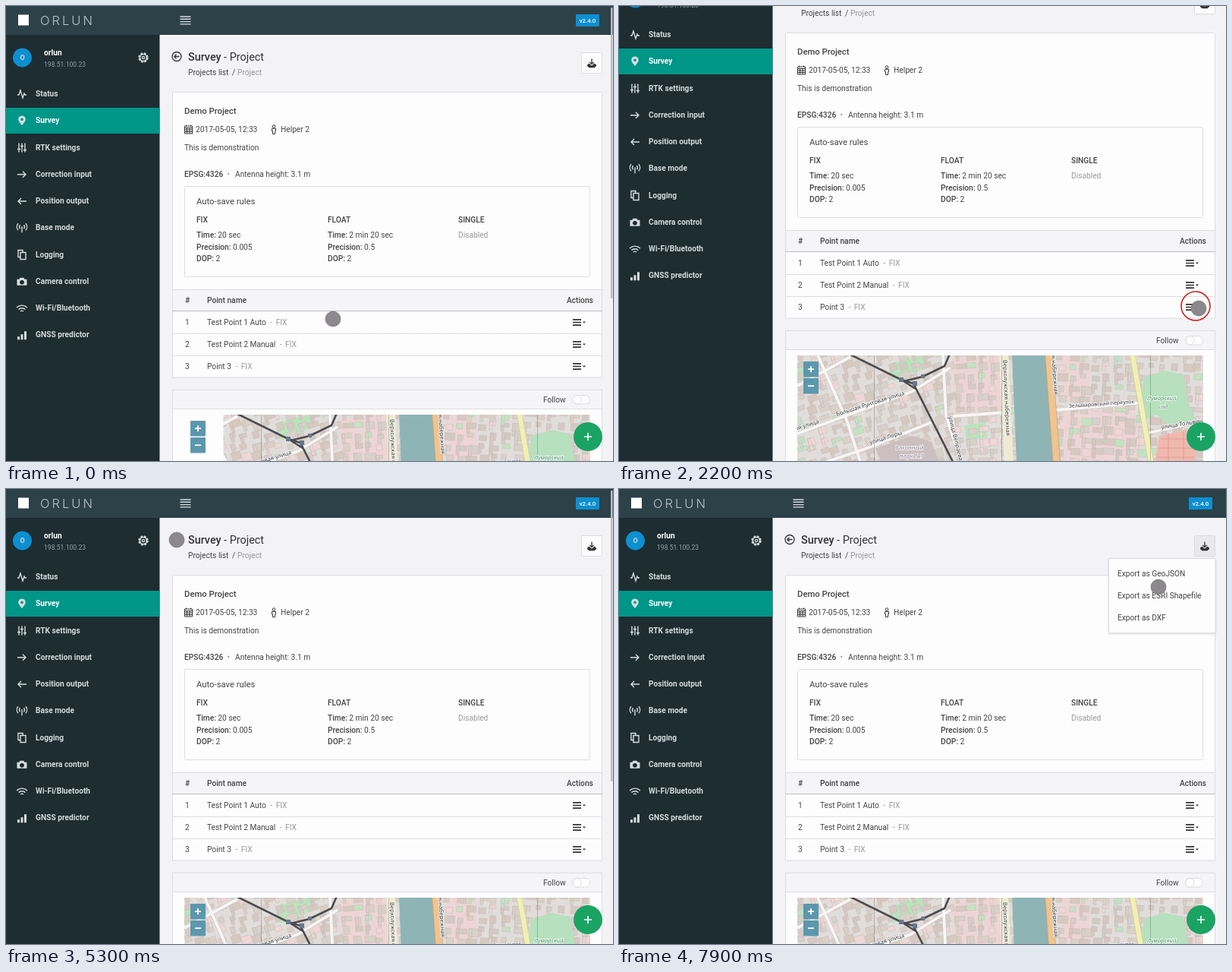
Animation, 800 px wide and 599 px high, one loop 8 s. Source, as an HTML page:

```html
<!DOCTYPE html>
<html lang="en">
<head>
<meta charset="utf-8">
<title>Survey project</title>
<style>
  html, body { margin: 0; width: 100%; height: 100%; overflow: hidden; }
  svg { display: block; width: 800px; height: 599px; background: #f3f2f5; }
  text { font: 10.2px Roboto, sans-serif; fill: #444; }
  .b { font-weight: 500; }
  .mid { font-size: 11.3px; }
  .title { font-size: 14.4px; fill: #333; }
  .mute { fill: #999; }
  .nav { font-weight: 600; fill: #d0d9dc; }
  .brand { font: 300 16.5px Inter, sans-serif; letter-spacing: 3px; fill: #b8c6cb; }
  .line { fill: none; stroke: #333; stroke-width: 1.3; }
  .light { fill: none; stroke: #d5dde0; stroke-width: 1.4; }
  .solid { fill: #d5dde0; fill-rule: evenodd; }
  .dark { fill: #333; }
  .card { fill: #fefdfe; stroke: #dddce0; }
  .head { fill: #f5f4f6; stroke: #dddce0; }
  .menu { fill: #fefdfe; stroke: #dcdcde; filter: drop-shadow(0 1px 1px #0002); }
  .map text { font: 7.6px "Noto Sans", sans-serif; fill: #333; stroke: #fff; stroke-width: 1.4px; paint-order: stroke; }
  .map path { fill: none; }
</style>
</head>
<body>
<script>
const text = (x, y, s, cls = '', attrs = '') => `<text x="${x}" y="${y}" dy=".355em" class="${cls}" ${attrs}>${s}</text>`;
const rect = (x, y, w, h, cls = '', attrs = '') => `<rect x="${x}" y="${y}" width="${w}" height="${h}" class="${cls}" ${attrs}/>`;
const icon = (x, y, d, cls = 'line', attrs = '') => `<path transform="translate(${x} ${y})" d="${d}" class="${cls}" ${attrs}/>`;
const bold = s => `<tspan class="b">${s}</tspan>`;
const fill = c => `fill="${c}"`;

// Sidebar
const navItems = [
  ['Status', 'M-6 1h2l2-6 3 10 2-6 1 2h2', 'light'],
  ['Survey', 'M0 6C-3 2-4.8 0-4.8-2a4.8 4.8 0 0 1 9.6 0C4.8 0 3 2 0 6ZM0-3.8a1.8 1.8 0 1 0 .01 0Z', 'solid'],
  ['RTK settings', 'M-4-6V6M0-6V6M4-6V6M-6 2h4M-2-2h4M2 3h4', 'light'],
  ['Correction input', 'M-6 0H5M1-4L5 0 1 4', 'light'],
  ['Position output', 'M6 0H-5M-1-4L-5 0-1 4', 'light'],
  ['Base mode', 'M-2.5-4a4 4 0 0 0 0 5M2.5-4a4 4 0 0 1 0 5M-5-6a7 7 0 0 0 0 9M5-6a7 7 0 0 1 0 9M0-2V6', 'light'],
  ['Logging', 'M-2-3h7v9h-7zM-2 3h-3v-9h6v3', 'light'],
  ['Camera control', 'M-6.5-3h3l1-2h5l1 2h3V5h-13ZM0-2a3 3 0 1 0 .01 0Z', 'solid'],
  ['Wi-Fi/Bluetooth', 'M-7-1a10 10 0 0 1 14 0M-4.5 1.5a6.5 6.5 0 0 1 9 0M-2 4a3 3 0 0 1 4 0', 'light'],
  ['GNSS predictor', 'M-6 2h3v4h-3zM-1.5-1h3v7h-3zM3-5h3V6H3z', 'solid'],
];
const sidebar = rect(0, 134, 202.5, 34, '', fill('#009688')) +
  navItems.map(([name, d, cls], i) => {
    const y = 115.5 + 35.25 * i;
    return icon(21, y + .5, d, cls) + text(39, y, name, 'nav', i == 1 ? 'style="fill:#fff"' : '');
  }).join('') +
  `<circle cx="21.5" cy="68" r="12.5" fill="#0d8fd0"/>` +
  text(21.5, 68, 'O', 'nav', 'text-anchor="middle" style="font-size:9px"') +
  text(50, 61, 'orlun', 'nav', 'style="fill:#fff"') +
  text(50, 76.5, '198.51.100.23', '', 'style="font-size:8.6px;fill:#8fa0a6"') +
  `<circle cx="181" cy="68" r="5.2" class="light" stroke-dasharray="2.6 1.5" style="stroke-width:3"/>
   <circle cx="181" cy="68" r="4.6" class="light"/><circle cx="181" cy="68" r="1.6" class="light"/>`;

const header = rect(0, 0, 800, 38, '', fill('#2d4149')) +
  rect(16, 11.5, 14, 14, '', fill('#fff')) + text(45, 19, 'ORLUN', 'brand') +
  icon(236.5, 19, 'M-7-5H7M-7-1.7H7M-7 1.6H7M-7 4.9H7', 'light') +
  rect(751, 11, 31, 16, '', fill('#0d8fd0') + ' rx="1"') +
  text(766.5, 19.2, 'v2.4.0', 'b', 'text-anchor="middle" style="font-size:7.8px;fill:#fff"');

// Map
let seed = 11;
const random = () => (seed = seed * 16807 % 2147483647) / 2147483647;
const block = (x, y, w, h, angle) => {
  const c = Math.cos(angle), s = Math.sin(angle);
  return `M${x} ${y}l${w * c} ${w * s} ${-h * s} ${h * c} ${-w * c} ${-w * s}z`;
};
const shades = { '#d9d0c9': '', '#d5c9c2': '', '#eed7d6': '', '#c3e2c4': '' };
for (let x = 232; x < 775; x += 15) {
  for (let y = 455; y < 605; y += 14) {
    const angle = x < 440 ? -.32 : x < 510 ? -.08 : .06, pick = random();
    const color = Object.keys(shades)[pick < .45 ? 0 : pick < .78 ? 1 : pick < .93 ? 2 : 3];
    const px = x + random() * 4, py = y + random() * 4, w = 6 + random() * 9, h = 5 + random() * 6;
    shades[color] += block(px, py, w, h, angle);
    if (random() < .5) shades[color] += block(px, py, 4, h + 6, angle);
  }
}
const stroke = (d, color, width) => `<path d="${d}" stroke="${color}" stroke-width="${width}" stroke-linejoin="round"/>`;
const area = (d, color) => `<path d="${d}" style="fill:${color}"/>`;
const label = (x, y, angle, s, style = '') => `<text transform="translate(${x} ${y}) rotate(${angle})" style="${style}">${s}</text>`;
const roads = 'M235 563L385 508 437 476M235 613L330 581 412 548M427 460L431 540 452 602M262 460L300 545 318 600' +
  'M575 532L690 522M698 562L770 546M440 540L510 535M235 500L305 462';
const rails = 'M303 458L372 492 388 497 441 602M375 494L400 488 429 474 436 458M372 492L391 504';
const map = `<clipPath id="mapClip">${rect(235, 460, 535, 150)}</clipPath>
<g class="map" transform="translate(0 78)" clip-path="url(#mapClip)">
  ${rect(235, 460, 535, 150, '', fill('#e0dddb'))}
  ${area('M440 465l60-5 4 75-62 6zM580 535l98-8 8 72-100 4zM582 460h36l4 55-38 6z', '#eed5d5')}
  ${area('M235 474l22-9 8 18-30 12zM355 472l42-12 14 14-50 20zM455 552l28-4 3 20-28 4z', '#b9e3bd')}
  ${Object.entries(shades).map(([c, d]) => `<path d="${d}" style="fill:${c}" stroke="#c6b9b2" stroke-width=".5"/>`).join('')}
  ${area('M338 582l48-16 26 8 10 28h-76z', '#cbbfc0')}
  ${area('M692 488l28-8 24 6 6 36 10 22-34 8-18-14-26 12 6-30z', '#b6e0be')}
  ${area('M712 566l48-10v45h-54z', '#efb9b0')}
  ${stroke('M714 570h44M712 582h46M710 594h48M724 562v40M744 558v40', '#e39a8f', 1)}
  ${stroke(roads, '#cbc4c0', 4.8)}${stroke(roads, '#f8f6f5', 3.8)}
  ${stroke('M507 455L514 605', '#eeebd2', 12)}
  ${area('M518 460h45l10 142h-49z', '#8eb4b6')}
  ${stroke('M566 455L577 605', '#c9a477', 10)}${stroke('M566 455L577 605', '#f0c48f', 8.5)}
  ${stroke('M676 455L702 605', '#cfcb90', 8)}${stroke('M676 455L702 605', '#f1efb8', 6.5)}
  ${stroke('M336.5 460V600M504.5 460V600M700.5 460V600', '#0004', .8)}
  ${stroke(rails, '#4c4b4e', 2.6)}
  ${area('M369 489h6v6h-6zM387 494h6v6h-6zM398 485h5v5h-5z', '#65788a')}
  ${label(287, 540, -17.5, 'Большая Рунтовая улица')}
  ${label(233, 559, -18, 'ая улица')}
  ${label(331, 577, -17, 'улица Лоры')}
  ${label(434, 541, 76, 'улица Вепраева')}
  ${label(506, 466, 87.5, 'Верхолужская набережная')}
  ${label(570, 460, 86, 'я набережная')}
  ${label(593, 529, -4, 'Зельмаровский переулок', 'font-size:6.9px')}
  ${label(715, 557, -9, 'улица Тольвина')}
  ${label(696, 519, 0, 'Лумарский', 'font-style:italic;fill:#3c8a5a')}
  ${label(711, 530, 0, 'сад', 'font-style:italic;fill:#3c8a5a')}
  ${label(364, 584, 0, 'Вагонный', 'fill:#87788a')}
  ${label(370, 595, 0, 'парк №7', 'fill:#87788a')}
</g>`;

// Pages
const pageTitle = name => icon(225, 66.5, 'M6 0A6 6 0 1 1-6 0 6 6 0 0 1 6 0ZM3.5 0H-3M-.5-2.8L-3.2 0-.5 2.8') +
  text(240, 66.5, bold('Survey') + ' - ' + name, 'title') + text(240, 87.5, 'Projects list <tspan dx="2">/</tspan>');

const rules = [
  [251, 'FIX', '20 sec', '0.005'],
  [424, 'FLOAT', '2 min 20 sec', '0.5'],
].map(([x, name, time, precision]) => text(x, 281.5, name, 'b') +
  text(x, 301, bold('Time:') + ' ' + time) + text(x, 317, bold('Precision:') + ' ' + precision) +
  text(x, 332.5, bold('DOP:') + ' 2')).join('');

const points = ['Test Point 1 Auto', 'Test Point 2 Manual', 'Point 3'].map((name, i) => {
  const y = 416.3 + 29 * i;
  return (i < 2 ? `<path d="M220 ${431.5 + 29 * i}H785" stroke="#dddce0"/>` : '') + text(236, y, i + 1) +
    text(265, y, `${name} <tspan class="mute" dx="3">- <tspan dx="2">FIX</tspan></tspan>`) +
    icon(752.5, y + .2, 'M-5.5-3.6h11M-5.5 0h11M-5.5 3.6h11', 'line', 'style="stroke-width:1.7"') +
    icon(762, y + .3, 'M-2-1h4L0 1.2z', 'dark');
}).join('');

const zoom = (y, d) => rect(243, y, 20, 20.5, '', fill('#5c97ad') + ' rx="1"') +
  icon(253, y + 10.2, d, '', 'stroke="#fff" stroke-width="1.8"');

const projectPage = pageTitle('Project') + text(305, 87.5, 'Project', 'mute') +
  rect(758.5, 61.5, 27, 27, 'card', 'id="exportButton" rx="1"') +
  icon(772, 75.5, 'M0-6V1M-2.6-1.6L0 1 2.6-1.6') +
  icon(772, 75.5, 'M-6 2L-3.5 0 0 3.2 3.5 0 6 2v1.5L3.5 5.8h-7L-6 3.5z', 'dark') +
  rect(219.5, 113.5, 566, 375.5, 'card', 'rx="1"') + text(235, 138, 'Demo Project', 'b mid') +
  icon(240.5, 162.5, 'M-5-4.5h10v10h-10zM-5-2h10M-5 .5h10M-5 3h10M-2-2v7M1.5-2v7M-3-6v2M3-6v2', 'line', 'style="stroke-width:1"') +
  text(250, 162.5, '2017-05-05, 12:33') +
  icon(353, 162.5, 'M-1.8-4a1.8 1.8 0 1 0 3.6 0 1.8 1.8 0 1 0-3.6 0M-2.5-1.2h5v3.5h-1V6h-3V2.3h-1z', 'line', 'style="stroke-width:1"') +
  text(362, 162.5, 'Helper 2') + text(235, 186, 'This is demonstration') +
  text(235, 221.5, 'EPSG:4326', 'b') + text(291.5, 221.5, '•', 'mute') + text(302, 221.5, 'Antenna height: 3.1 m') +
  rect(235.5, 237.5, 534, 119, 'card', 'rx="2"') + text(251, 257, 'Auto-save rules', 'mid') + rules +
  text(596, 281.5, 'SINGLE', 'b') + text(596, 301, 'Disabled', 'mute') +
  rect(219.5, 373.5, 566, 28, 'head') + rect(220, 461, 565, 28, '', 'id="activeRow" fill="#f3f2f4"') +
  text(236, 387.5, '#', 'b') + text(265, 387.5, 'Point name', 'b') + text(739, 387.5, 'Actions', 'b') +
  '<path d="M219 401.5H786" stroke="#bdbcc0"/>' + points +
  rect(219.5, 505.5, 566, 400, 'card') + rect(219.5, 505.5, 566, 25, 'head') + text(708, 518, 'Follow') +
  rect(746.5, 512.5, 23, 11.5, 'card', 'rx="5.7"') + '<circle cx="752.5" cy="518.3" r="5.7" class="card"/>' +
  map + rect(235, 538, 51.5, 140, '', 'id="missingTile" fill="#fefdfe"') +
  zoom(546, 'M-4 0h8M0-4v8') + zoom(568, 'M-4 0h8') +
  `<g id="removeMenu">${rect(624.5, 482.5, 140, 39.5, 'menu', 'rx="2"')}
    ${icon(642, 502.5, 'M-4.5-2.5h9V6h-9zM-6-2.5H6M-2-2.5V-5h4v2.5M-1.7 0v3.5M1.7 0v3.5', 'line', 'style="stroke:#e0392f"')}
    ${text(658, 502.5, 'Remove point')}</g>
  <g id="exportMenu">${rect(645.5, 91.5, 140.5, 98, 'menu', 'rx="2"')}
    ${['GeoJSON', 'ESRI Shapefile', 'DXF'].map((f, i) => text(657, 111 + 29 * i, 'Export as ' + f)).join('')}</g>`;

const sigmas = [['Lat:', '59.96032536°', 'E', '0.002'], ['Lon:', '30.33406695°', 'N', '0.001'], ['H:', '59.387 m', 'U', '0.003']];
const pointPage = pageTitle('Point info') + text(307, 87.5, 'Demo Project <tspan dx="2">/</tspan>') + text(379, 87.5, 'Point', 'mute') +
  rect(219.5, 113.5, 566, 163, 'card', 'rx="1"') + text(235, 137, 'Point name', 'b') + text(235, 159, 'Test Point 1 Auto', 'mid') +
  text(235, 200.5, 'Antenna height', 'b mid') + text(235, 221.5, '3.1 m') + text(510, 200.5, 'EPSG:4326', 'b mid') +
  sigmas.map(([name, value, axis, error], i) => {
    const y = 221.5 + 15.7 * i;
    return text(510, y, name) + text(532, y, value, 'b') +
      text(648, y, `σ<tspan style="font-size:5.5px">${axis}</tspan> = ${bold(error + ' m')}`);
  }).join('');

document.body.innerHTML = `<svg viewBox="0 0 800 599">
  ${rect(0, 0, 202.5, 599, '', fill('#1e2d32'))}
  <g id="page">${header}${sidebar}<g id="project">${projectPage}</g><g id="point">${pointPage}</g></g>
  ${rect(797, 2, 2.5, 383, '', 'id="scrollbar" rx="1" fill="#bcbbbf"')}
  <circle cx="767" cy="567" r="19" fill="#1ba364"/>
  ${icon(767, 567, 'M-5 0h10M0-5v10', '', 'stroke="#fff" stroke-width="1.6"')}
  <circle id="ring" r="19" fill="none" stroke="#d0251c" stroke-width="1.6"/>
  <circle id="cursor" r="10" fill="#8b898b" stroke="#7b797b" stroke-width=".8"/>
</svg>`;

// Motion: cursor stops as [time, x, y], clicks as [start, end, x, y]
const stops = [
  [0, 431, 412], [1000, 431, 412], [1300, 433, 402], [1400, 433, 402], [2100, 764, 398], [2900, 764, 398],
  [3300, 761, 372], [3700, 456, 338], [4200, 456, 338], [4720, 225, 67], [5300, 225, 67], [5900, 535, 314],
  [6200, 535, 314], [6700, 775, 79], [6900, 775, 79], [7000, 771, 88], [7400, 771, 88], [7900, 711, 129], [8000, 711, 129],
];
const clicks = [[2100, 2500, 760, 395], [3700, 4000, 456, 338], [6600, 6900, 776, 78]];
const $ = id => document.getElementById(id);
const place = (id, x, y) => $(id).setAttribute('transform', `translate(${x} ${y})`);
const show = (id, on) => $(id).style.display = on ? '' : 'none';
const smooth = (t, a, b) => { const k = Math.min(1, Math.max(0, (t - a) / (b - a))); return k * k * (3 - 2 * k); };

function draw(now) {
  const t = Math.floor(now % 8000 / 100) * 100;
  const i = stops.findIndex(s => s[0] > t), [t0, x0, y0] = stops[i - 1], [t1, x1, y1] = stops[i];
  const k = smooth(t, t0, t1);
  place('cursor', x0 + (x1 - x0) * k, y0 + (y1 - y0) * k);

  const onPoint = t >= 4000 && t < 5300;
  const scroll = t < 4000 ? Math.round(78 * smooth(t, 0, 1000)) : 0;
  place('page', 0, -scroll);
  place('scrollbar', 0, scroll * .64);
  show('scrollbar', t < 1200 || t >= 5300 && t < 5900);
  show('project', !onPoint);
  show('point', onPoint);
  show('missingTile', t < 400);

  const removing = t >= 2800 && t < 3900, exporting = t >= 6800;
  show('removeMenu', removing);
  show('activeRow', removing);
  show('exportMenu', exporting);
  $('exportButton').style.fill = exporting ? '#e9e8ea' : '';

  const click = clicks.find(c => t >= c[0] && t < c[1]);
  show('ring', click);
  if (click) place('ring', click[2], click[3]);
  requestAnimationFrame(draw);
}
draw(0);
</script>
</body>
</html>
```
